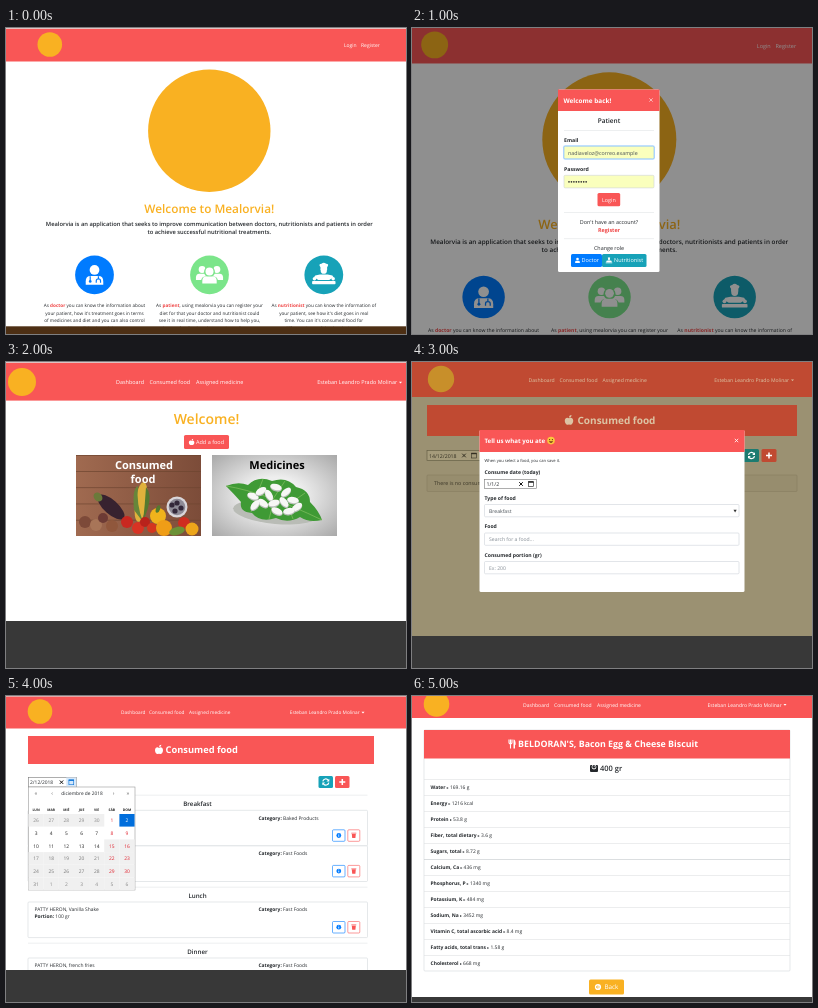
An HTML page for the animation above (6000 ms loop, 400 by 306 pixels).

```html
<!DOCTYPE html>
<html lang="en">
<head>
<meta charset="utf-8">
<title>Nutrition app tour</title>
<style>
html, body { margin: 0; width: 100%; height: 100%; overflow: hidden; background: #fff; }
svg { display: block; width: 400px; height: 306px; }
text { font-family: "Open Sans", "Noto Sans", sans-serif; text-rendering: geometricPrecision; white-space: pre; }
</style>
</head>
<body>
<svg id="stage" viewBox="0 0 400 306"></svg>
<script>
const RED = '#f95656', ORANGE = '#f9b122', BLUE = '#007bff', TEAL = '#17a2b8', INK = '#24282c', FOOT = '#383838';
const BRAND = 'Mealorvia', USER = 'Esteban Leandro Prado Molinar', GRILL = 'PATTY HERON', DINER = "BELDORAN'S";

const rect = (x, y, w, h, fill, extra = '') => `<rect x="${x}" y="${y}" width="${w}" height="${h}" fill="${fill}" ${extra}/>`;
const box = (x, y, w, h, stroke = '#d4d8dc', fill = '#fff', rx = 1) =>
  rect(x, y, w, h, fill, `stroke="${stroke}" stroke-width=".6" rx="${rx}"`);
const disc = (x, y, r, fill) => `<circle cx="${x}" cy="${y}" r="${r}" fill="${fill}"/>`;
const oval = (x, y, rx, ry, fill, turn = 0) =>
  `<ellipse rx="${rx}" ry="${ry}" fill="${fill}" transform="translate(${x} ${y}) rotate(${turn})"/>`;
const path = (d, fill, extra = '') => `<path d="${d}" fill="${fill}" ${extra}/>`;
const stroke = (d, color, width = 1) => path(d, 'none', `stroke="${color}" stroke-width="${width}"`);
const rule = (x, y, w, color = '#e2e4e6') => rect(x, y, w, .6, color);
const at = (x, y, s, inner) => `<g transform="translate(${x} ${y}) scale(${s})">${inner}</g>`;
const text = (x, y, size, s, fill = INK, weight = 400, anchor = 'start') =>
  `<text x="${x}" y="${y}" font-size="${size}" fill="${fill}" font-weight="${weight}" text-anchor="${anchor}">${s}</text>`;
const mid = (x, y, size, s, fill, weight) => text(x, y, size, s, fill, weight, 'middle');
const bold = (s, fill = INK) => `<tspan font-weight="700" fill="${fill}">${s}</tspan>`;

// Icons are drawn around 0,0 in a box about 10 units wide.
const apple = (x, y, s, c = '#fff') => at(x, y, s,
  path('M0-2C-2-3.5-5-2.5-5 1C-5 4-3 6-1.5 5.6Q0 5 1.5 5.6C3 6 5 4 5 1C5-2.5 2-3.5 0-2ZM0-3Q0-6 3-6Q3-3 0-3', c));
const person = (x, y, s, c = '#fff') => at(x, y, s,
  disc(0, -2.6, 2.5, c) + path('M-4.5 5V3.3Q-4.5.5-2 .5H2Q4.5.5 4.5 3.3V5Z', c));
const doctor = (x, y, s, ground) => person(x, y, s) + at(x, y, s,
  stroke('M-2.2.6V3M2 .6V2M.9 4V3Q.9 2 2 2T3.1 3V4', ground, .6) + disc(-2.2, 3.3, .7, ground));
const cook = (x, y, s) => at(x, y, s,
  path('M-1.7-2.6H1.7V-4Q3-5.6 1.2-5.8Q0-6.8-1.2-5.8Q-3-5.6-1.7-4Z', '#fff') + disc(0, -2.2, 1.6, '#fff') +
  path('M-2.8 2.6L-5 1.2L-4.4.2L-2-.2H2L4.4.2L5 1.2L2.8 2.6Z', '#fff') + rect(-6, 3.1, 12, 1.7, '#fff', 'rx=".4"') +
  disc(-4.8, 1.9, .9, '#fff') + disc(4.8, 1.9, .9, '#fff'));
const crowd = (x, y, s, ground) => person(x - 3.8 * s, y - s, s * .7) + person(x + 3.8 * s, y - s, s * .7) +
  at(x, y, s, disc(0, -1.6, 2.8, ground) + path('M-4.4 5V3Q-4 .8-2 .8H2Q4 .8 4.4 3V5Z', ground)) + person(x, y + .3 * s, s * .82);
const refresh = (x, y) => at(x, y, 1,
  stroke('M-3-.6A3 3 0 0 1 2.4-1.8M3 .6A3 3 0 0 1-2.4 1.8', '#fff', 1.2) +
  path('M3.5-3.3V-.5H.7ZM-3.5 3.3V.5H-.7Z', '#fff'));
const plus = (x, y) => stroke(`M${x - 3} ${y}h6m-3-3v6`, '#fff', 1.5);
const cross = (x, y, r, c, w = 1) => stroke(`M${x - r} ${y - r}l${2 * r} ${2 * r}m0 ${-2 * r}l${-2 * r} ${2 * r}`, c, w);
const dateIcon = (x, y, c) => box(x - 2.4, y - 2.3, 4.8, 4.8, c, 'none', 0) + rect(x - 2.6, y - 2.6, 5.2, 1.3, c);

// logo: [x, y, r]; links: x of the three links; caret: x of the arrow after the user name
function nav({ bar, logo, y, size, links, caret, fill = RED, ink = '#fff', mark = ORANGE }) {
  const labels = ['Dashboard', 'Consumed food', 'Assigned medicine'];
  return rect(0, 0, 400, bar, fill) + disc(...logo, mark) +
    labels.map((s, i) => text(links[i], y, size, s, ink)).join('') +
    text(caret - 1.8, y, size, USER, ink, 400, 'end') + path(`M${caret} ${y - 2.6}h3l-1.5 1.7z`, ink);
}

function home() {
  const em = s => bold(s, '#ef4444');
  const roles = [
    [88.5, BLUE, doctor, [`As ${em('doctor')} you can know the information about`, "your patient, how it's treatment goes in terms",
      'of medicines and diet and you can also control', "it's medicine in real time."]],
    [203.5, '#7be58a', crowd, [`As ${em('patient')}, using ${BRAND.toLowerCase()} you can register your`, 'diet for that your doctor and nutritionist could',
      'see it in real time, understand how to help you,', 'give you feedback and start private diagnoses']],
    [317.8, TEAL, cook, [`As ${em('nutritionist')} you can know the information of`, "your patient, see how it's diet goes in real",
      "time. You can it's consumed food for", 'different times of the day during the']],
  ];
  return rect(-30, 0, 460, 330, '#fff') + rect(-30, 0, 460, 33.5, RED) + disc(43.8, 16.5, 12.3, ORANGE) +
    text(338, 19, 5, 'Login', '#fff') + text(355, 19, 5, 'Register', '#fff') + disc(203.3, 102.8, 61.2, ORANGE) +
    mid(203.3, 185, 11.8, `Welcome to ${BRAND}!`, ORANGE, 600) +
    mid(203.3, 198, 5.77, `${BRAND} is an application that seeks to improve communication between doctors, nutritionists and patients in order`, INK, 600) +
    mid(203.3, 205.9, 5.77, 'to achieve successful nutritional treatments.', INK, 600) +
    roles.map(([x, c, icon, lines]) => disc(x, 246.8, 19.4, c) + icon(x, 247, 1.95, c) +
      lines.map((s, i) => mid(x, 279 + i * 7.6, 4.65, s)).join('')).join('');
}

const intro = () => home() + rect(0, 0, 400, .8, '#ddd') + rect(0, 298.3, 400, 8, '#4d2f14');

function login() {
  const line = y => rule(152, y, 90);
  const field = (y, border) => box(152, y, 90, 12.6, border, '#faffbd', 1.2);
  return `<g transform="translate(-25.3 -1.2) scale(1.095)">${home()}</g>` + rect(0, 0, 400, 306, '#000', 'opacity=".44"') +
    rect(146, 61.5, 101.5, 182.5, '#fff', 'rx="1.5"') + rect(146, 61.5, 101.5, 21.5, RED) +
    text(151.5, 74.6, 6.4, 'Welcome back!', '#fff', 700) + cross(239, 72, 1.7, '#fbd0d0', .8) +
    mid(197, 95, 6.5, 'Patient', INK, 600) + line(102) +
    text(152, 114, 5.2, 'Email', INK, 700) +
    rect(151, 117.2, 92, 14.6, '#bfdeff', 'rx="2"') + field(118.2, '#80bdff') + text(156, 126.6, 5.3, 'nadiaveloz@correo.example', '#495057') +
    text(152, 142.7, 5.2, 'Password', INK, 700) + field(147.3, '#ced4da') +
    Array.from({ length: 8 }, (_, i) => disc(157 + i * 2.45, 153.8, .85, '#333')).join('') +
    rect(185.5, 165, 22.7, 13.2, RED, 'rx="1.5"') + mid(196.9, 173.7, 5.4, 'Login', '#fff') + line(184) +
    mid(197, 195.6, 5.4, "Don't have an account?") + mid(197, 203.6, 5.4, 'Register', '#ef4444', 700) + line(210.5) +
    mid(197, 222, 5.4, 'Change role') +
    rect(159, 226, 31, 13, BLUE, 'rx="1.5"') + person(165.5, 232.4, .52) + text(169.6, 234.4, 5.5, 'Doctor', '#fff') +
    rect(190, 226, 44.5, 13, TEAL, 'rx="1.5"') + cook(197, 232.7, .55) + text(202, 234.4, 5.5, 'Nutritionist', '#fff');
}

function foodPhoto() {
  const planks = [0, 1, 2, 3, 4].map(i => rect(70, 93 + i * 16.2, 125, .7, '#6e4530')).join('');
  const olives = [[166, 143], [171, 141], [175, 146], [169, 149]].map(([x, y]) => disc(x, y, 2.6, '#33283a')).join('');
  return rect(70, 93, 125, 81, 'url(#wood)') + planks +
    oval(105, 145, 7, 17, '#37222f', -48) + oval(92, 135, 4, 5, '#6a7a3a', -40) +
    disc(79, 160, 6, '#7d4a39') + disc(90, 163, 6, '#a87558') + disc(97, 156, 5, '#6d3b35') + disc(106, 164, 6, '#90573c') +
    oval(135, 140, 6, 20, '#e0b13c', 8) + path('M128 148Q126 126 132 124Q130 142 137 160Z', '#66863a') + path('M142 146Q146 132 140 125Q139 142 137 160Z', '#55792f') +
    disc(171, 145, 10.5, '#d9d6da') + disc(171, 145, 8.3, '#8e8b96') + olives +
    disc(121, 160, 6, '#c92820') + disc(132, 166, 6, '#d83324') + disc(139, 160, 5, '#b9221b') + disc(178, 161, 6, '#cf2d20') + disc(146, 166, 5, '#d4361f') +
    disc(152, 154, 8, '#f0b31c') + disc(158, 166, 8, '#ef9d17') + disc(186, 167, 6.5, '#eda61b') + oval(152, 147, 2, 4, '#547a2e', 20) +
    oval(171, 169, 8, 4, '#6c9237', -15);
}

function pillPhoto() {
  const pills = [[247, 134, 20], [255, 129, -30], [263, 133, 60], [270, 125, 15], [280, 130, -40], [268, 141, -15],
    [257, 141, 35], [278, 140, 50], [287, 138, 10], [291, 145, -35], [249, 143, -50], [271, 149, 25], [283, 149, -10]];
  return rect(206, 93, 125, 81, 'url(#fog)') + oval(270, 150, 43, 12, '#b9bcb6', 5) +
    path('M220 124Q232 119 242 123Q252 113 266 119Q281 114 290 125Q304 128 304 140Q313 149 316 158Q303 161 294 155Q282 162 270 156Q254 161 246 151Q233 150 235 140Q228 132 220 124Z', '#3f9a35') +
    stroke('M220 124Q258 130 316 158M250 135L257 117M265 140L279 119M279 145L299 131M250 136L245 150M267 142L263 157M284 149L287 157', '#7dbb5e', .8) +
    pills.map(([x, y, turn]) => oval(x, y + 1, 6, 3.4, '#b9beb8', turn) + oval(x, y, 5.8, 3.1, '#f7f7f5', turn)).join('');
}

function dashboard() {
  return rect(0, 0, 400, 306, '#fff') +
    nav({ bar: 38.6, logo: [16, 20, 14], y: 22.4, size: 5.45, links: [110, 143.5, 190], caret: 393 }) + rect(0, 0, 400, .8, '#ddd') +
    mid(200.5, 62, 14, 'Welcome!', ORANGE, 600) +
    rect(178, 73, 45, 14, RED, 'rx="1.6"') + apple(185.6, 80, .55) + text(190, 82.2, 5.5, 'Add a food', '#fff') +
    foodPhoto() + pillPhoto() +
    mid(138, 107, 11, 'Consumed', '#fff', 700) + mid(137, 121, 11, 'food', '#fff', 700) + mid(271, 107, 11, 'Medicines', '#000', 700) +
    rect(0, 259, 400, 47, FOOT);
}

function addFood() {
  const label = (y, s) => text(72.5, y, 5.1, s, INK, 700);
  const field = (y, s, c) => box(72.5, y, 254.5, 12.3, '#ced4da') + text(77, y + 8, 5.1, s, c);
  return rect(0, 0, 400, 306, '#9b9172') +
    nav({ bar: 35, logo: [29, 17, 13.2], y: 20, size: 5.1, links: [116.5, 147.5, 190.5], caret: 379, fill: '#c04a32', ink: '#dcc4a4', mark: '#c88f2a' }) +
    rect(15, 43, 370, 31, '#c04a32') + apple(157, 58, .85, '#dcc4a4') + text(165.5, 61.8, 10, 'Consumed food', '#dcc4a4', 700) +
    box(15, 88.5, 54, 10, '#5c573f', '#a59b7b', 0) + text(17, 95.6, 5.2, '14/12/2018', '#332f22') + cross(52, 93.5, 1.8, '#332f22') + dateIcon(62, 93.5, '#332f22') +
    rect(331, 87, 16, 13, '#1c7b70', 'rx="1.5"') + refresh(339.5, 93.5) + rect(349.5, 87, 15, 13, '#c04a32', 'rx="1.5"') + plus(357, 93.5) +
    box(15, 113, 370, 16.5, '#867d61', '#978d6e') + text(22, 123, 5.3, 'There is no consumed food', '#3b3627') +
    rect(67.5, 68, 265, 162, '#fff', 'rx="1.5"') + rect(67.5, 68, 265, 22, RED) +
    text(72.5, 80.9, 6.1, 'Tell us what you ate', '#fff', 700) +
    disc(139, 78.6, 3.8, '#fbc63c') + disc(137.6, 77.6, .6, '#5a3512') + disc(140.4, 77.6, .6, '#5a3512') + path('M136.8 79.3h4.4q-2.2 3.4-4.4 0', '#7a3b18') +
    cross(324.5, 78.5, 1.7, '#fff', .8) +
    text(72.5, 100.2, 4.1, 'When you select a food, you can save it.') +
    label(112.3, 'Consume date (today)') + box(72.5, 117.3, 52, 9.3, '#777', '#fff', 0) + text(74.5, 124, 5.2, '1/1/2') + cross(109, 122, 1.8, '#111') + dateIcon(119, 122, '#111') +
    label(137.6, 'Type of food') + field(142.5, 'Breakfast', '#495057') + path('M321.5 147.8h3.2l-1.6 2.6z', '#333') +
    label(166, 'Food') + field(171, 'Search for a food...', '#868e96') +
    label(194.6, 'Consumed portion (gr)') + field(199.5, 'Ex: 200', '#868e96') +
    rect(0, 274, 400, 32, FOOT);
}

function calendar() {
  const left = 22.5, cell = 15.15, rowH = 12.7, top = 118;
  const names = ['LUN', 'MAR', 'MIÉ', 'JUE', 'VIE', 'SÁB', 'DOM'];
  let out = box(left, 91, 106.5, 103, '#999', '#fff', 0);
  ['«', '‹', '›', '»'].forEach((s, i) => out += mid([30, 46, 107.5, 122][i], 99.3, 5.6, s, '#666'));
  out += mid(76, 99.3, 4.8, 'diciembre de 2018');
  names.forEach((s, i) => out += mid(left + cell * (i + .5), 114.8, 3.4, s, '#222', 700));
  for (let i = 0; i < 42; i++) {
    const date = new Date(2018, 10, 26 + i), day = date.getDate(), col = i % 7;
    const inMonth = date.getMonth() === 11, picked = inMonth && day === 2;
    const x = left + col * cell, y = top + Math.floor(i / 7) * rowH;
    const ink = picked ? '#fff' : !inMonth ? '#888' : col > 4 ? '#e0202c' : day > 14 ? '#777' : '#222';
    if (picked || i < 5 || i > 18) out += rect(x, y, cell, rowH - .1, picked ? '#006edc' : '#f0f0f0');
    out += mid(x + cell / 2, y + 8.3, 4.9, day, ink);
  }
  return out;
}

function meals() {
  const section = (y, s) => rule(22, y, 339.5) + mid(191.5, y + 10.8, 6.2, s, INK, 600);
  const card = (y, food, grams, kind) => box(22, y, 339.5, 35.6) + text(28.5, y + 9.2, 4.9, food) +
    text(28.5, y + 16.4, 4.9, `${bold('Portion:')} ${grams} gr`) + text(252.5, y + 9.2, 4.9, `${bold('Category:')} ${kind}`) +
    box(326.5, y + 19.5, 12.5, 11.5, BLUE) + disc(332.8, y + 25.2, 2.4, BLUE) + rect(332.4, y + 24.8, .8, 1.7, '#fff') + rect(332.4, y + 23.5, .8, .8, '#fff') +
    box(341.8, y + 19.5, 12, 11.5, RED) + path(`M345.8 ${y + 23.7}h4l-.4 4.1h-3.2zM345.3 ${y + 22.5}h5v.8h-5z`, RED);
  return rect(0, 0, 400, 306, '#fff') +
    nav({ bar: 32.5, logo: [34, 15.5, 12.3], y: 18.3, size: 4.75, links: [115, 143, 183], caret: 355.5 }) + rect(0, 0, 400, .6, '#ddd') +
    rect(22, 40, 346, 28, RED) + apple(153, 53.5, .8) + text(159.5, 57, 9.3, 'Consumed food', '#fff', 700) +
    box(22.5, 81.5, 48, 9.5, '#777', '#fff', 0) + text(24, 88.3, 4.9, '2/12/2018') + cross(55.5, 86.2, 1.7, '#111') +
    rect(60.3, 81.5, 10, 9.3, '#d5e8fb') + dateIcon(65.3, 86.2, '#0b74d8') +
    rect(312.5, 80, 14.5, 12, TEAL, 'rx="1.5"') + refresh(319.8, 86) + rect(329, 80, 14.5, 12, RED, 'rx="1.5"') + plus(336.3, 86) +
    section(98.8, 'Breakfast') + card(114.3, `${DINER}, Bacon Egg &amp; Cheese Biscuit`, 400, 'Baked Products') + card(149.9, `${GRILL}, Hash Brown`, 100, 'Fast Foods') +
    section(190.8, 'Lunch') + card(206, `${GRILL}, Vanilla Shake`, 100, 'Fast Foods') +
    section(246.8, 'Dinner') + card(262, `${GRILL}, french fries`, 100, 'Fast Foods') +
    calendar() + rect(0, 274, 400, 32, FOOT);
}

function details() {
  const facts = ['Water|169.16 g', 'Energy|1216 kcal', 'Protein|53.8 g', 'Fiber, total dietary|3.6 g', 'Sugars, total|8.72 g', 'Calcium, Ca|436 mg',
    'Phosphorus, P|1340 mg', 'Potassium, K|484 mg', 'Sodium, Na|3452 mg', 'Vitamin C, total ascorbic acid|8.4 mg', 'Fatty acids, total trans|1.58 g', 'Cholesterol|668 mg'];
  const rows = facts.map((fact, i) => {
    const [name, amount] = fact.split('|'), y = 83 + i * 16;
    return rule(12, y, 366, i === 5 ? '#c4c8cb' : '#dfe1e3') +
      text(18.5, y + 10.3, 4.95, `${bold(name)} <tspan font-size="3.8" font-family="DejaVu Sans, sans-serif">▸</tspan> ${amount}`);
  }).join('');
  return rect(0, 0, 400, 306, '#fff') +
    nav({ bar: 22, logo: [24.5, 8, 12.8], y: 10.6, size: 5.05, links: [111, 142, 185], caret: 371.5 }) +
    box(12, 34, 366, 241) + rect(12, 34, 366, 28.5, RED) +
    stroke('M97 43.5v3q0 1.5 1.5 1.5t1.5-1.5v-3M98.5 43.5v9', '#fff', 1.1) + path('M101.5 52.5v-9q2.2 0 2.2 5.2h-.7v3.8z', '#fff') +
    text(106, 51.2, 8.85, `${DINER}, Bacon Egg &amp; Cheese Biscuit`, '#fff', 700) +
    rect(178, 69, 8, 7, INK, 'rx="1"') + disc(182, 71, 2.4, '#fff') + disc(182, 70.8, 1.7, INK) + stroke('M182 71l1-1.6', '#fff', .5) +
    text(188, 75.2, 7.5, '400 gr', INK, 600) + rows +
    rect(177, 283.5, 35, 15, ORANGE, 'rx="1.6"') + disc(186, 291, 3.1, '#fff') + stroke('M187.8 291h-3.4m1.5-1.6l-1.6 1.6l1.6 1.6', ORANGE, .8) +
    text(192.5, 293.4, 6.3, 'Back', '#fff') + rect(0, 301, 400, 5, FOOT);
}

const scenes = [intro, login, dashboard, addFood, meals, details];
const HOLD = 1000, LOOP = HOLD * scenes.length;
const stage = document.getElementById('stage');
stage.innerHTML = `<defs>
  <radialGradient id="fog" r=".75"><stop offset=".3" stop-color="#eeeeee"/><stop offset="1" stop-color="#a2a2a2"/></radialGradient>
  <linearGradient id="wood"><stop stop-color="#a06a50"/><stop offset="1" stop-color="#7c4c39"/></linearGradient></defs>` +
  scenes.map(draw => `<g class="scene" opacity="0">${draw()}</g>`).join('');

stage.querySelectorAll('.scene').forEach((scene, i) => scene.animate(
  [{ opacity: 1, easing: 'step-end' }, { opacity: 0, offset: HOLD / LOOP }, { opacity: 0 }],
  { duration: LOOP, delay: i * HOLD - LOOP, iterations: Infinity }));
</script>
</body>
</html>
```
